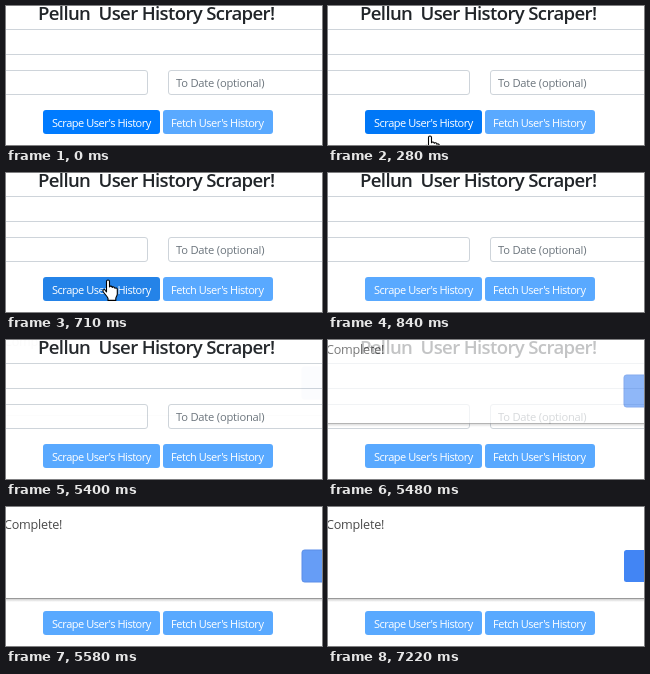
These frames come from a looping animation (316 by 139 pixels, 7250 ms). An HTML page:

```html
<!DOCTYPE html>
<html lang="en">
<head>
<meta charset="utf-8">
<title>User History Scraper</title>
<style>
  html, body { margin: 0; width: 100%; height: 100%; overflow: hidden; background: #fff; }
  svg { display: block; width: 316px; height: 139px; font-family: "Open Sans", "Noto Sans", sans-serif; }
  .title { font-size: 18.6px; font-weight: 600; letter-spacing: -.64px; fill: #212529; }
  .field { fill: #fff; stroke: #ced4da; }
  .hint { font-size: 11.2px; letter-spacing: -.22px; fill: #6c757d; }
  .label { font-size: 11px; font-weight: 500; letter-spacing: -.47px; fill: #fff; }
  .message { font-size: 12.6px; letter-spacing: -.22px; fill: #4a4a4a; }
</style>
</head>
<body>
<svg viewBox="0 0 316 139">
  <defs>
    <linearGradient id="shade" x1="0" y1="0" x2="0" y2="1">
      <stop offset="0" stop-color="#000" stop-opacity=".42"/>
      <stop offset=".35" stop-color="#000" stop-opacity=".16"/>
      <stop offset="1" stop-color="#000" stop-opacity="0"/>
    </linearGradient>
  </defs>
  <rect width="316" height="139" fill="#fff"/>
  <text class="title" x="32" y="14">Pellun</text>
  <text class="title" x="92.5" y="14">User History Scraper!</text>
  <rect class="field" x="-9.5" y="23.5" width="340" height="25"/>
  <rect class="field" x="-9.5" y="64.5" width="151" height="24" rx="2.5"/>
  <rect class="field" x="162.5" y="64.5" width="170" height="24" rx="2.5"/>
  <text class="hint" x="170" y="81">To Date (optional)</text>
  <rect id="scrape" x="37" y="104" width="117" height="24" rx="3"/>
  <text class="label" x="46" y="121">Scrape User's History</text>
  <rect x="157" y="104" width="110" height="24" rx="3" fill="#59a9ff"/>
  <text class="label" x="165" y="121">Fetch User's History</text>
  <g id="dialog">
    <rect x="-10" y="91" width="336" height="4" fill="url(#shade)"/>
    <rect x="-10" y="-40" width="336" height="131" fill="#fff"/>
    <path d="M0 91.5H316" stroke="#999"/>
    <text class="message" x="-2" y="22">Complete!</text>
    <rect id="ok" x="296" y="43" width="40" height="32" rx="2.5"/>
  </g>
  <path id="hand" fill="#fff" stroke="#000" stroke-width="1.1" stroke-linejoin="round"
    d="M4.5 12.5V2.2C4.5 .1 7.5 .1 7.5 2.2V7.5C8 6.3 10 6.5 10.2 8C11 7 12.8 7.4 12.9 8.9C13.7 8.2 15.3 8.6 15.3 10.2V14.5C15.3 16.5 13.8 17.5 13.8 19V21H6V19C5.4 17 2.7 14.8 1.2 12.3C.1 10.3 2.4 9.4 3.3 10.9Z"/>
</svg>
<script>
  const LOOP = 7250;
  const $ = id => document.getElementById(id);
  const scrape = $('scrape'), dialog = $('dialog'), ok = $('ok'), hand = $('hand');

  const IDLE = [0, 123, 255], HOVER = [0, 105, 217], OFF = [89, 169, 255];
  const ENTER = [250, 295, 340, 385, 430];
  const LEAVE = [610, 670, 725, 780, 840];
  const DROP = [5400, 5450, 5480, 5530, 5580];

  // Progress 0..1 that advances only at the given times
  const stepped = (t, times) => times.filter(s => t >= s).length / times.length;
  const mix = (a, b, p) => `rgb(${a.map((v, i) => Math.round(v + (b[i] - v) * p))})`;
  const easeOut = p => 1 - (1 - p) ** 2;

  function draw(t) {
    const enter = stepped(t, ENTER), leave = stepped(t, LEAVE), drop = stepped(t, DROP);

    scrape.setAttribute('fill', leave ? mix(HOVER, OFF, leave) : mix(IDLE, HOVER, enter));

    const handY = 112 + 27 * (1 - easeOut(enter)) - 14 * leave;
    hand.setAttribute('transform', `translate(96 ${handY.toFixed(1)})`);
    hand.setAttribute('visibility', enter > 0 && leave < 1 ? 'visible' : 'hidden');

    const alpha = drop <= .2 ? drop * .1 : 1 - 1.7 * (1 - drop) ** 2;
    dialog.setAttribute('opacity', drop ? alpha.toFixed(3) : 0);
    dialog.setAttribute('transform', `translate(0 ${Math.round(-20 * (1 - drop))})`);

    const plain = t >= 7220;
    ok.setAttribute('fill', plain ? '#4285f4' : '#669df6');
    ok.setAttribute('stroke', plain ? 'none' : '#5a8de8');
  }

  const start = performance.now();
  function tick() {
    draw((performance.now() - start) % LOOP);
    requestAnimationFrame(tick);
  }
  draw(0);
  requestAnimationFrame(tick);
</script>
</body>
</html>
```
